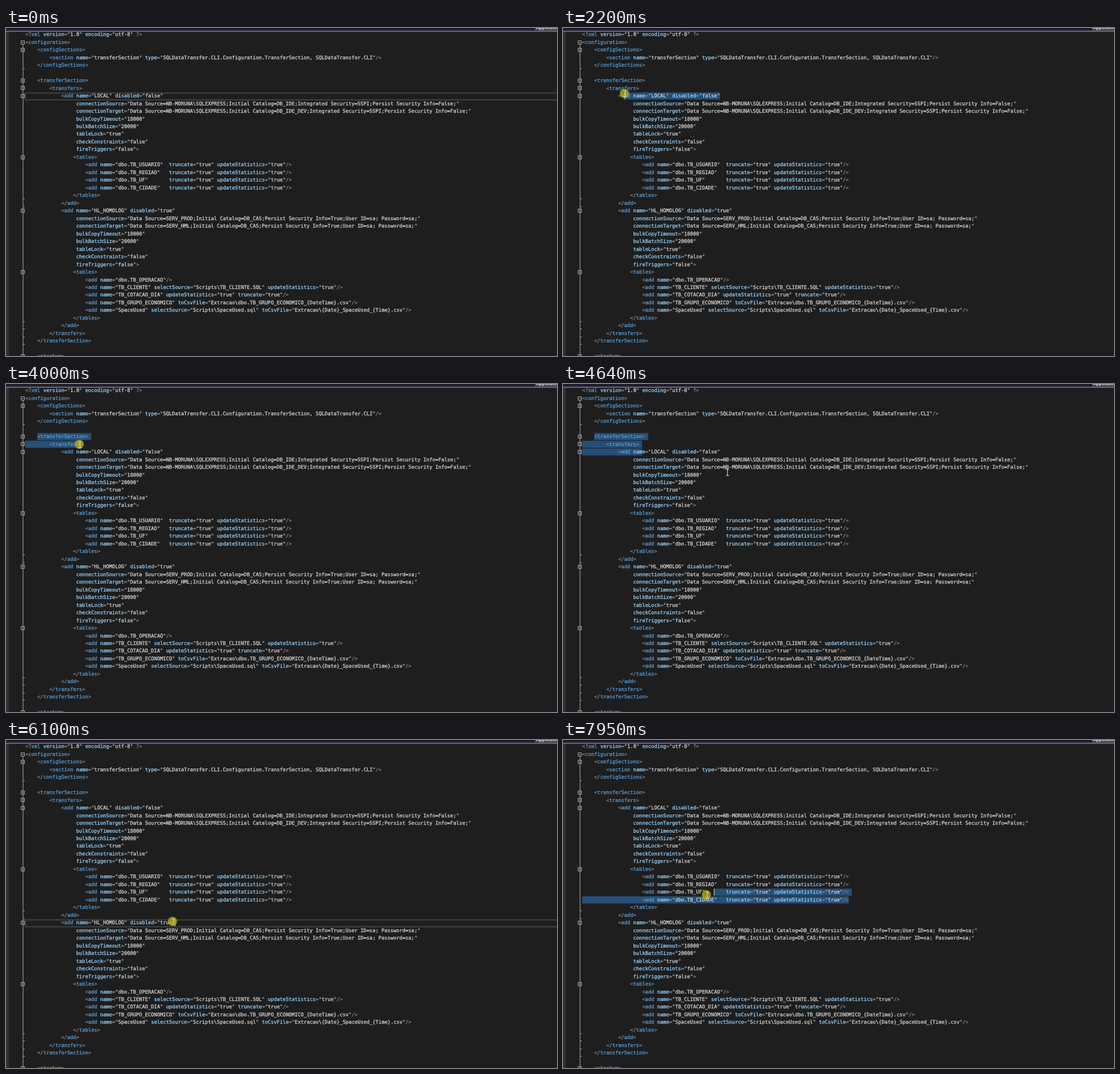
Recreate the animation shown at these times as an HTML page. Size 970x577 px, loop 7990 ms.

```html
<!DOCTYPE html>
<html lang="en">
<head>
<meta charset="utf-8">
<title>Config editor</title>
<style>
  html, body { margin: 0; width: 100%; height: 100%; overflow: hidden; background: #1e1e1e; }
  svg { display: block; width: 970px; height: 577px; }
  text { white-space: pre; text-rendering: geometricPrecision; }
  #code text { font: 8.753px "DejaVu Sans Mono", "Noto Sans Mono", monospace; }
  #code tspan { fill: currentColor; stroke: currentColor; stroke-width: .3; }
  .mark { color: #808080; }
  .quote { color: #a4a4a4; }
  .tag { color: #569cd6; }
  .attr { color: #96cff8; }
  .value { color: #d2d2d2; }
  #sel { fill: #264f78; }
  #line { fill: none; stroke: #464646; stroke-width: 1.8; }
  #caret { fill: #dcdcdc; }
  #fold { fill: #1e1e1e; stroke: #b0b0b0; stroke-width: 1; }
  #beam { fill: none; stroke: #d8d8d8; stroke-width: 1.1; }
  #press { fill: #b9b010; fill-opacity: .78; }
  .tab { font: bold 8px "Open Sans", sans-serif; fill: #e6e6e6; }
</style>
</head>
<body>
<svg viewBox="0 0 970 577">
  <rect width="970" height="577" fill="#1e1e1e"/>
  <rect y="6" width="5" height="571" fill="#333333"/>
  <rect id="line" x="34" width="940" height="12"/>
  <path id="sel"/>
  <path id="fold"/>
  <g id="code"></g>
  <rect id="caret" width="1" height="12.5"/>
  <rect width="970" height="5" fill="#1f1f22"/>
  <rect y="4.8" width="970" height="1.7" fill="#7f6dc0"/>
  <rect x="931" width="39" height="5" fill="#424245"/>
  <text class="tab" x="933" y="2">Application</text>
  <g id="mouse">
    <circle id="press" cx="-1.5" cy="-1" r="8"/>
    <path id="beam" d="M-2.5-5.5H-.8L0-5 .8-5.5H2.5M0-5V5M-2.5 5.5H-.8L0 5 .8 5.5H2.5"/>
  </g>
</svg>
<script>
const source = String.raw`<?xml version="1.0" encoding="utf-8" ?>
<configuration>
    <configSections>
        <section name="transferSection" type="SQLDataTransfer.CLI.Configuration.TransferSection, SQLDataTransfer.CLI"/>
    </configSections>

    <transferSection>
        <transfers>
            <add name="LOCAL" disabled="false"
                 connectionSource="Data Source=NB-MORUNA\SQLEXPRESS;Initial Catalog=DB_IDE;Integrated Security=SSPI;Persist Security Info=False;"
                 connectionTarget="Data Source=NB-MORUNA\SQLEXPRESS;Initial Catalog=DB_IDE_DEV;Integrated Security=SSPI;Persist Security Info=False;"
                 bulkCopyTimeout="18000"
                 bulkBatchSize="20000"
                 tableLock="true"
                 checkConstraints="false"
                 fireTriggers="false">
                <tables>
                    <add name="dbo.TB_USUARIO"  truncate="true" updateStatistics="true"/>
                    <add name="dbo.TB_REGIAO"   truncate="true" updateStatistics="true"/>
                    <add name="dbo.TB_UF"       truncate="true" updateStatistics="true"/>
                    <add name="dbo.TB_CIDADE"   truncate="true" updateStatistics="true"/>
                </tables>
            </add>
            <add name="HL_HOMOLOG" disabled="true"
                 connectionSource="Data Source=SERV_PROD;Initial Catalog=DB_CAS;Persist Security Info=True;User ID=sa; Password=sa;"
                 connectionTarget="Data Source=SERV_HML;Initial Catalog=DB_CAS;Persist Security Info=True;User ID=sa; Password=sa;"
                 bulkCopyTimeout="18000"
                 bulkBatchSize="20000"
                 tableLock="true"
                 checkConstraints="false"
                 fireTriggers="false">
                <tables>
                    <add name="dbo.TB_OPERACAO"/>
                    <add name="TB_CLIENTE" selectSource="Scripts\TB_CLIENTE.SQL" updateStatistics="true"/>
                    <add name="TB_COTACAO_DIA" updateStatistics="true" truncate="true"/>
                    <add name="TB_GRUPO_ECONOMICO" toCsvFile="Extracao\dbo.TB_GRUPO_ECONOMICO_{DateTime}.csv"/>
                    <add name="SpaceUsed" selectSource="Scripts\SpaceUsed.sql" toCsvFile="Extracao\{Date}_SpaceUsed_{Time}.csv"/>
                </tables>
            </add>
        </transfers>
    </transferSection>

    <startup>`;

const LEFT = 34, TOP = 5.4, CHAR = 5.27, ROW = 13.475, LOOP = 7990, LAG = 15;
const lines = source.split("\n");
const $ = id => document.getElementById(id);
const colX = c => LEFT + c * CHAR;
const rowY = r => TOP + r * ROW;

// Syntax colouring
const span = (cls, s) =>
  `<tspan class="${cls}">${s.replace(/</g, "&lt;").replace(/>/g, "&gt;")}</tspan>`;
const paint = s => s.replace(/"([^"]*)"|[<>\/?=]+|\w+(=?)/g, (m, value, eq) => {
  if (value !== undefined) return span("quote", '"') + span("value", value) + span("quote", '"');
  if (!/\w/.test(m)) return span("mark", m);
  return eq ? span("attr", m.slice(0, -1)) + span("mark", "=") : span("tag", m);
});

// Code lines, with a fold box at each opening tag and a tick below each closing one
let code = "", fold = "M30 28V577";
lines.forEach((s, r) => {
  const body = s.trimStart(), y = Math.floor(rowY(r) + 6.2) + .5;
  code += `<text x="${colX(s.length - body.length)}" y="${rowY(r) + 8.9}">${paint(body)}</text>`;
  if (body.startsWith("</")) fold += `M30 ${y + 6}h3`;
  else if (/^<\w/.test(body) && !body.includes("/>")) fold += `M26.5 ${y - 3}h6v6h-6zM28 ${y}h3`;
});
$("code").innerHTML = code;
$("fold").setAttribute("d", fold);

// Pointer moves: start, end, x, y, button held
const moves = [
  [0, 0, 881, 538, 0], [440, 600, 381, 190, 0], [720, 1080, 277, 118, 0],
  [1140, 2200, 109.5, 116, 1], [2320, 2640, 204, 118, 1], [2840, 3040, 194, 115, 1],
  [3200, 3640, 57, 91, 0], [3720, 3980, 130.5, 107, 1], [4080, 4400, 139, 121, 1],
  [4440, 4620, 290, 157, 0], [4620, 4800, 278, 120, 0], [4820, 5110, 188, 120, 1],
  [5240, 5760, 340, 358, 0], [5760, 6000, 300, 320, 0], [6040, 6440, 214, 319, 1],
  [6780, 7030, 316, 178, 0], [7150, 7200, 316, 175, 1], [7240, 7560, 508, 285, 0],
  [7590, 8100, 188, 270, 1]
].map(([start, end, x, y, held]) => ({ start, end, x, y, held }));

// Held moves in a row form one drag
const drags = [];
moves.forEach((m, i) => {
  if (!m.held) return;
  if (moves[i - 1].held) drags[drags.length - 1].up = m.end;
  else drags.push({ down: m.start, up: m.end });
});

function pointer(t) {
  const i = moves.findLastIndex(m => m.start <= t);
  const to = moves[i], from = moves[i - 1] || to;
  const k = Math.min(1, (t - to.start) / (to.end - to.start || 1));
  const e = k * k * (3 - 2 * k);
  return [from.x + (to.x - from.x) * e, from.y + (to.y - from.y) * e];
}

function textPos(t) {
  const [x, y] = pointer(t);
  const row = Math.floor((y - TOP) / ROW);
  return { row, col: Math.max(0, Math.min(lines[row].length, Math.round((x - LEFT) / CHAR))) };
}

function selection(a, b) {
  if (a.row > b.row || (a.row === b.row && a.col > b.col)) [a, b] = [b, a];
  let d = "";
  for (let r = a.row; r <= b.row; r++) {
    const x0 = colX(r === a.row ? a.col : 0);
    const x1 = colX(r === b.row ? b.col : lines[r].length + 1);
    d += `M${x0} ${rowY(r)}H${x1}v${ROW - 1}H${x0}z`;
  }
  return d;
}

const show = (id, on) => $(id).setAttribute("visibility", on ? "inherit" : "hidden");

function draw(t) {
  const drag = drags.filter(d => d.down <= t).pop();
  let anchor = { row: 8, col: 46 }, head = anchor;
  if (drag) {
    anchor = textPos(drag.down);
    head = textPos(Math.max(drag.down, Math.min(t, drag.up) - LAG));
  }
  const empty = anchor.row === head.row && anchor.col === head.col;
  show("line", empty);
  $("line").setAttribute("y", rowY(head.row) + 1.2);
  $("sel").setAttribute("d", empty ? "" : selection(anchor, head));
  show("caret", drag && t < drag.up + 100);
  $("caret").setAttribute("x", colX(head.col) - .3);
  $("caret").setAttribute("y", rowY(head.row));
  show("mouse", t >= moves[1].start);
  show("press", drag && t < drag.up);
  $("mouse").setAttribute("transform", `translate(${pointer(t)})`);
}

const start = performance.now();
function tick() {
  draw((performance.now() - start) % LOOP);
  requestAnimationFrame(tick);
}
tick();
</script>
</body>
</html>
```
